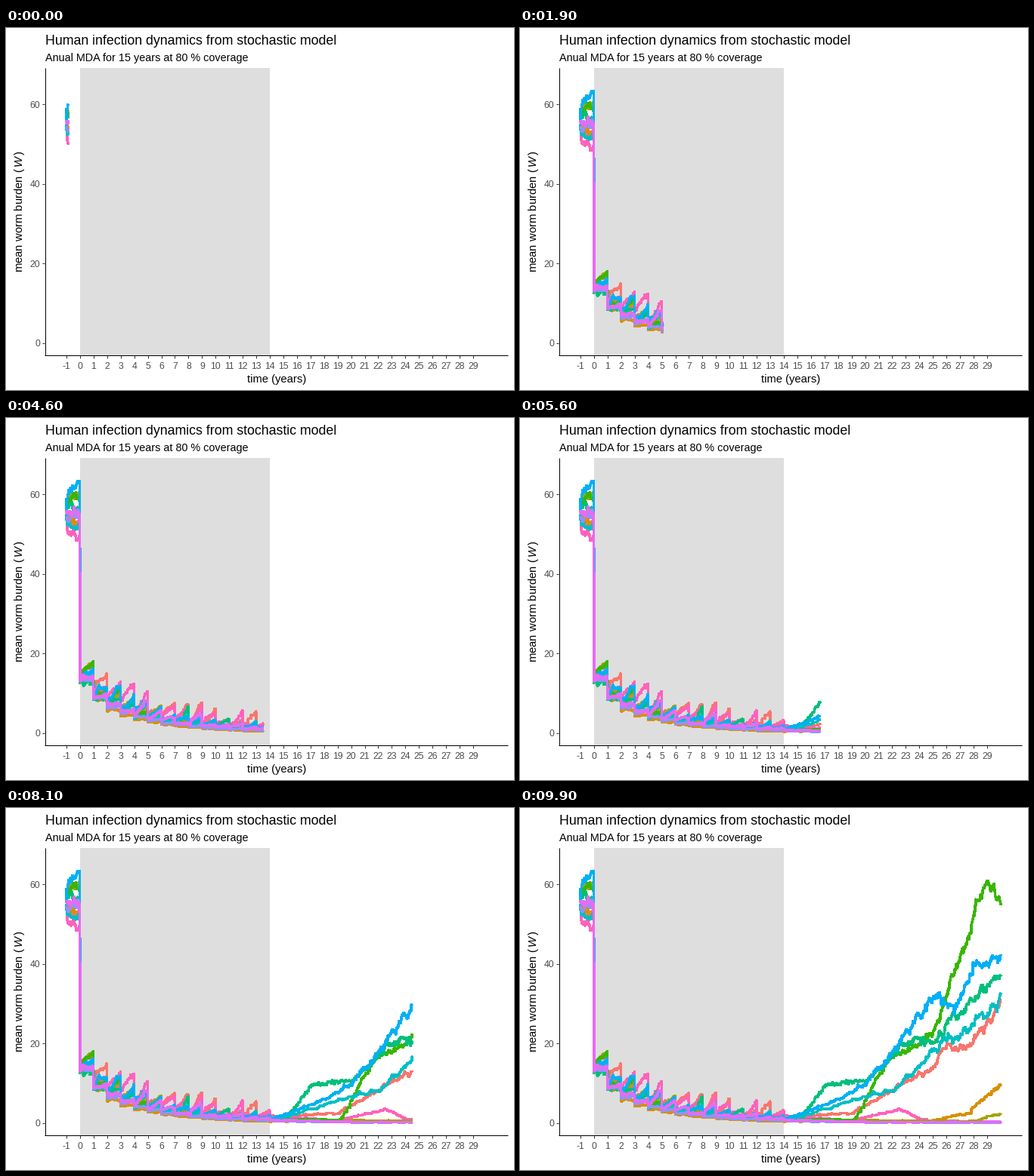
Animation of 672 by 480 pixels, one loop 10000 ms. Source, as a matplotlib script:

```python
import numpy as np
import matplotlib.pyplot as plt
from matplotlib.animation import FuncAnimation
from matplotlib.patches import Rectangle

plt.rcParams.update({
    "font.family": "Liberation Sans",
    "mathtext.fontset": "custom",
    "mathtext.it": "Liberation Sans:italic",
    "path.simplify": False,
})

W, H, DPI = 672, 480, 96
FRAMES, INTERVAL = 100, 100
PT = 72 / DPI
STEPS = 60                      # samples per year
LAST_DOSE = 14
T = np.arange(31 * STEPS + 1) / STEPS - 1


def px(t):
    return 97.9 + 17.935 * t


def py(v):
    return 417.5 - 5.268 * v


def after_dose(start, rate, year):
    return start * np.exp(-rate * year ** 0.745)


def smooth_noise(rng, keep=0.9):
    kicks = rng.normal(size=T.size) * np.sqrt(1 - keep ** 2)
    out = np.zeros(T.size)
    for i in range(1, T.size):
        out[i] = keep * out[i - 1] + kicks[i]
    return out


def worm_burden(rng, before, start, rate, regrowth, later):
    """Equilibrium, yearly doses with regrowth, then rebound or die-out."""
    first, last = before
    level = first + (last - first) * np.clip(T + 1, 0, 1) ** 0.4

    for year in range(LAST_DOSE):
        low = after_dose(start, rate, year)
        gain = regrowth * min(1, (year + 1) / 4) * rng.exponential()
        rise = min(low * gain, 5)
        now = T >= year
        level[now] = low + rise * np.clip(T[now] - year, 0, 1) ** rng.uniform(0.5, 2)

    knots = [(LAST_DOSE, after_dose(start, rate, LAST_DOSE)), *later]
    level = np.where(T >= LAST_DOSE, np.interp(T, *zip(*knots)), level)

    spread = np.minimum(0.04 + 0.03 * level, 0.8)
    value = np.maximum(level + spread * smooth_noise(rng), 0.08)

    # hold values between events; few worms means few events
    moves = rng.random(T.size) < np.clip(level / 12, 0.05, 0.5)
    moves[::STEPS] = True
    held = np.maximum.accumulate(np.where(moves, np.arange(T.size), 0))
    return value[held]


fig = plt.figure(figsize=(W / DPI, H / DPI), dpi=DPI, facecolor="white")
ax = fig.add_axes([0, 0, 1, 1])
ax.set(xlim=(0, W), ylim=(H, 0))
ax.axis("off")


def label(x, y, text, size, color="black", **kw):
    ax.text(x, y, text, fontsize=size * PT, color=color, va="baseline", **kw)


def rule(xs, ys, color="black"):
    ax.plot(xs, ys, color=color, lw=PT, solid_capstyle="butt", zorder=5)


ax.add_patch(Rectangle((98, 53), 251, 381, fc="#dedede", lw=0, zorder=0))
rule([51.5, 51.5], [53, 434])
rule([51, 664], [433.5, 433.5])

for year in range(-1, 30):
    x = px(year)
    rule([x, x], [434, 437.5], "#333333")
    label(x, 452, str(year), 12.3, "#4d4d4d", ha="center")
for v in range(0, 61, 20):
    y = py(v)
    rule([48, 51], [y, y], "#333333")
    label(45.5, y + 4.7, str(v), 12.3, "#4d4d4d", ha="right")

label(51.5, 22, "Human infection dynamics from stochastic model", 17.76)
label(51.7, 44, "Anual MDA for 15 years at 80 % coverage", 14.36)
label(358, 470, "time (years)", 14.8, ha="center")
label(22, 324.5, r"mean worm burden ($\,W\,$)", 14.9,
      rotation=90, rotation_mode="anchor")

lines = []


def add(color, before, start, rate, regrowth, *later):
    rng = np.random.default_rng(len(lines) + 11)
    v = worm_burden(rng, before, start, rate, regrowth, later)
    line, = ax.plot([], [], color=color, lw=2.6 * PT, antialiased=False,
                    solid_capstyle="butt", solid_joinstyle="round", zorder=3)
    lines.append((line, py(v)))


# later points are (year, burden)
add("#F8766D", (54, 52), 14, 0.32, 0.8,
    (19, 2.5), (25, 14), (26, 20), (27.3, 18.5), (30, 29.5))
add("#FF62BC", (53, 48.5), 15, 0.32, 0.8, (19, 0.6), (22.6, 3.5), (24.3, 0.3))
add("#D89000", (55, 52), 13.5, 0.5, 0.05, (24.5, 0.3), (27.5, 2.5), (30, 9.5))
add("#A3A500", (57, 60), 15, 0.42, 0.3, (28, 0.4), (30, 2.5))
add("#39B600", (58, 59.5), 14.5, 0.4, 0.4,
    (19.2, 0.8), (21.5, 15), (25, 22), (28.8, 60), (30, 56))
add("#00BF7D", (59, 55), 12.5, 0.38, 0.6,
    (15.2, 1.2), (17, 9.5), (20, 10.5), (23.7, 22), (25, 20.5), (30, 38))
add("#00BFC4", (55, 52), 13, 0.4, 0.5,
    (15, 1.5), (20, 6.5), (22, 8), (26.3, 22), (27.5, 23), (30, 32))
add("#00B0F6", (56, 64.3), 14.5, 0.37, 0.7,
    (16, 3), (20, 9.5), (25.5, 33), (26.6, 28), (28, 40), (30, 41))
add("#9590FF", (54, 54.5), 13.5, 0.45, 0.1, (20, 0.1))
add("#E76BF3", (56, 56), 14, 0.4, 0.5, (20, 0.2))


def draw(i):
    end = -0.85 + 31 * i / (FRAMES - 1)
    shown = T <= end
    for line, y in lines:
        line.set_data(px(T[shown]), y[shown])
    return [line for line, _ in lines]


anim = FuncAnimation(fig, draw, frames=FRAMES, interval=INTERVAL,
                     repeat=True, repeat_delay=0)
plt.show()
```
